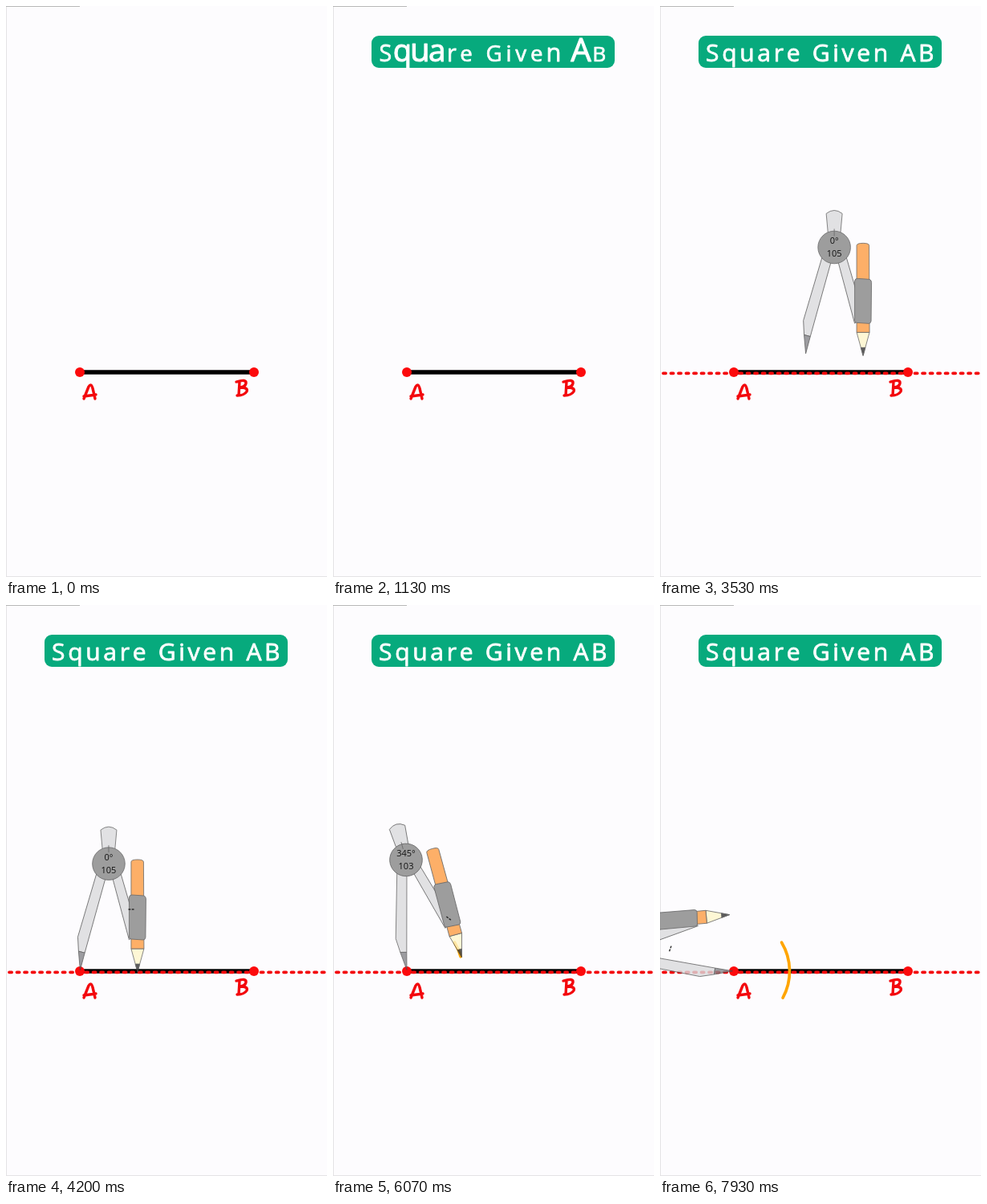
An HTML page with a canvas for the animation above (8000 ms loop, 400x711 px).

```html
<!DOCTYPE html>
<html lang="en">
<head>
<meta charset="utf-8">
<title>Square construction</title>
<style>
html, body { margin: 0; width: 100%; height: 100%; overflow: hidden; background: #fdfcfe; }
canvas { display: block; width: 100%; height: 100%; }
</style>
</head>
<body>
<canvas id="stage" width="400" height="711"></canvas>
<script>
const W = 400, H = 711, LOOP = 8000;
const A = { x: 92, y: 456 }, B = { x: 309, y: 456 };
const RED = '#f3070c', EDGE = '#444', STEEL = '#dbdbdd', GREY = '#868686';
const LEG = 138.6, UNIT = 0.685;
const RAD = Math.PI / 180;
const ARC_FROM = -31, ARC_TO = 28.5;

const ctx = document.getElementById('stage').getContext('2d');
const layer = document.createElement('canvas');
layer.width = W;
layer.height = H;
const tool = layer.getContext('2d');

const clamp = v => Math.max(0, Math.min(1, v));
const mix = (a, b, p) => a + (b - a) * p;
const ease = (t, from, to) => (1 - Math.cos(Math.PI * clamp((t - from) / (to - from)))) / 2;

function shape(c, path, fill, stroke, width = 0.8) {
  const p = new Path2D(path);
  if (fill) { c.fillStyle = fill; c.fill(p); }
  if (stroke) { c.strokeStyle = stroke; c.lineWidth = width; c.stroke(p); }
}

function dot(p) {
  ctx.fillStyle = '#fc0a0c';
  ctx.beginPath();
  ctx.arc(p.x, p.y, 6, 0, 7);
  ctx.fill();
}

function line(x1, y1, x2, y2, color, width) {
  ctx.strokeStyle = color;
  ctx.lineWidth = width;
  ctx.beginPath();
  ctx.moveTo(x1, y1);
  ctx.lineTo(x2, y2);
  ctx.stroke();
}

function drawPaper() {
  ctx.fillStyle = '#fdfcfe';
  ctx.fillRect(0, 0, W, H);
  ctx.fillStyle = '#e4e3e5';
  ctx.fillRect(0, 0, 1, H);
  ctx.fillRect(0, H - 1, W, 1);
  ctx.fillStyle = '#b8b8b8';
  ctx.fillRect(0, 0, 92, 1);
}

function drawTitle(t) {
  if (t < 200) return;
  ctx.save();
  ctx.globalAlpha = clamp((t - 170) / 400);
  ctx.fillStyle = '#07aa7d';
  ctx.beginPath();
  ctx.roundRect(48, 37, 303, 40, 9);
  ctx.fill();
  ctx.globalAlpha = 1;
  ctx.fillStyle = ctx.strokeStyle = '#fff';
  ctx.lineWidth = 0.8;
  ctx.font = '30px "Open Sans", "Noto Sans", sans-serif';
  ctx.textAlign = 'center';

  // Two pulses run along the letters; the first one also reveals them.
  const second = 2 + (t - 1130) / 35, first = second + 10.7;
  const pulse = d => Math.exp(-((d / 1.6) ** 4));
  const base = mix(0.92, 1, ease(t, 1250, 1530));
  const swell = 0.42 * (1 - ease(t, 1400, 1530));
  let x = 57;
  [...'Square Given AB'].forEach((ch, i) => {
    const w = ctx.measureText(ch).width;
    const shown = clamp(first + 2 - i);
    const s = shown * (base + swell * Math.max(pulse(i - first), pulse(i - second)));
    if (s > 0.01) {
      ctx.save();
      ctx.translate(x + w / 2, 69);
      ctx.scale(s, s);
      ctx.fillText(ch, 0, 0);
      ctx.strokeText(ch, 0, 0);
      ctx.restore();
    }
    x += w + 3.7;
  });
  ctx.restore();
}

function drawSegment(t) {
  line(A.x, A.y, B.x, B.y, '#000', 5.6);
  ctx.save();
  ctx.lineCap = 'round';
  if (t >= 1730) {
    ctx.setLineDash([3.2, 6.3]);
    line(4, 457.3, W, 457.3, RED, 3.7);
    ctx.setLineDash([]);
  }
  dot(A);
  dot(B);
  shape(ctx, 'M97 489 L103 474 Q106 469 108 476 L111 489 M97 486 L112 484', null, RED, 3.4);
  shape(ctx, 'M287 468 Q300 464 299 470 Q298 474 292 475 Q302 475 300 480 Q297 485 288 485 M291 468 L290 485',
    null, RED, 3.4);
  ctx.restore();
}

function drawArc(t, angle) {
  if (t < 5650) return;
  const end = t < 6870 ? angle : ARC_TO;
  ctx.save();
  ctx.lineCap = 'round';
  ctx.strokeStyle = '#ffa500';
  ctx.lineWidth = 3.7;
  ctx.beginPath();
  ctx.arc(A.x, A.y, 69.5, ARC_FROM * RAD, end * RAD);
  ctx.stroke();
  ctx.restore();
}

// Leg coordinates: y runs from the hinge to the tip, x points outward.
function drawLeg(c, hinge, side, tilt, path, needle) {
  c.save();
  c.translate(hinge.x, hinge.y);
  c.scale(side, 1);
  c.rotate(-tilt);
  shape(c, path, STEEL, EDGE);
  if (needle) shape(c, needle, '#858589', EDGE);
  c.restore();
}

function drawPencil(c, r) {
  c.save();
  c.translate(r, 0);
  shape(c, 'M-8 -28 L8 -28 L0 1 Z', '#fff6cb', EDGE);
  shape(c, 'M-2.8 -9 L2.8 -9 L0 1 Z', '#333', EDGE);
  shape(c, 'M-8 -28 V-136 Q-8 -139 0 -139 Q7.5 -139 7.5 -136 L8 -28 Z', '#fd9d43', EDGE);
  shape(c, 'M-10.5 -92 Q-10 -95 -7 -95 L8 -94 Q10.5 -93 10.5 -90 L10 -42 Q9.5 -39 7 -39 L-8 -40 Q-10.5 -40 -10.5 -43 Z',
    GREY, EDGE);
  c.restore();
}

// The readout stays upright while the compass turns.
function drawReadout(pos, hinge, angle, size) {
  const cos = Math.cos(angle * RAD), sin = Math.sin(angle * RAD);
  const x = pos.x + hinge.x * cos - hinge.y * sin;
  const y = pos.y + hinge.x * sin + hinge.y * cos;
  ctx.fillStyle = '#111';
  ctx.font = '11px "Open Sans", "Noto Sans", sans-serif';
  ctx.textAlign = 'center';
  ctx.fillText((Math.round(angle) + 360) % 360 + '°', x, y - 4);
  ctx.fillText(Math.round(size), x, y + 12);
}

function drawCompass(pos, angle, size) {
  const r = size * UNIT;
  const hinge = { x: r / 2, y: -Math.sqrt(LEG * LEG - r * r / 4) };
  const tilt = Math.asin(r / 2 / LEG);
  const c = tool;
  c.clearRect(0, 0, W, H);
  c.save();
  c.translate(pos.x, pos.y);
  c.rotate(angle * RAD);
  c.lineJoin = 'round';

  const { x, y } = hinge;
  shape(c, `M${x - 6} ${y + 2} L${x - 10} ${y - 42} Q${x} ${y - 50} ${x + 10} ${y - 42} L${x + 6} ${y + 2} Z`,
    STEEL, EDGE);
  drawLeg(c, hinge, -1, tilt, 'M0 0 H11 L13.5 98 L8 115 L0 115 L-1 0 Z', 'M0 115 H8 L0 137 Z');
  drawLeg(c, hinge, 1, tilt, 'M0 0 H11 L13 92 L0 98 Z');
  drawPencil(c, r);
  c.fillStyle = GREY;
  c.strokeStyle = EDGE;
  c.beginPath();
  c.arc(x, y, 20.3, 0, 7);
  c.fill();
  c.stroke();
  shape(c, `M${x} ${y - 23} V${y - 14}`, null, EDGE);
  c.restore();

  ctx.globalAlpha = 0.8;
  ctx.drawImage(layer, 0, 0);
  ctx.globalAlpha = 1;
  drawReadout(pos, hinge, angle, size);
}

function drawHandle(t, angle) {
  if (t < 4100) return;
  let x, y, turn = 0;
  if (t < 5150) {
    const p = ease(t, 4200, 4700);
    x = mix(156, 161, p);
    y = mix(379, 390.5, p);
  } else {
    const a = (angle * 1.36 - 31) * RAD;
    x = A.x + 84 * Math.cos(a);
    y = A.y + 84 * Math.sin(a);
    turn = a + Math.PI / 2;
  }
  ctx.save();
  ctx.translate(x, y);
  ctx.rotate(turn);
  ctx.fillStyle = '#222';
  ctx.fillRect(-3.5, -0.7, 2.8, 1.4);
  ctx.fillRect(0.7, -0.7, 2.8, 1.4);
  ctx.restore();
}

function compassAngle(t) {
  if (t < 5650) return ARC_FROM * ease(t, 5150, 5600);
  if (t < 7370) return mix(ARC_FROM, ARC_TO, ease(t, 5650, 6870));
  return mix(ARC_TO, -150, ease(t, 7370, 8266));
}

function draw(t) {
  const angle = compassAngle(t);
  drawPaper();
  drawTitle(t);
  drawSegment(t);
  drawArc(t, angle);
  if (t >= 3020) {
    const p = ease(t, 2960, 3850);
    const pos = { x: mix(405, A.x, p), y: mix(380, A.y, p) };
    drawCompass(pos, angle, mix(105, 103, ease(t, 4250, 4700)));
    drawHandle(t, angle);
  }
}

ctx.lineJoin = 'round';
function tick() {
  draw(performance.now() % LOOP);
  requestAnimationFrame(tick);
}
tick();
</script>
</body>
</html>
```
